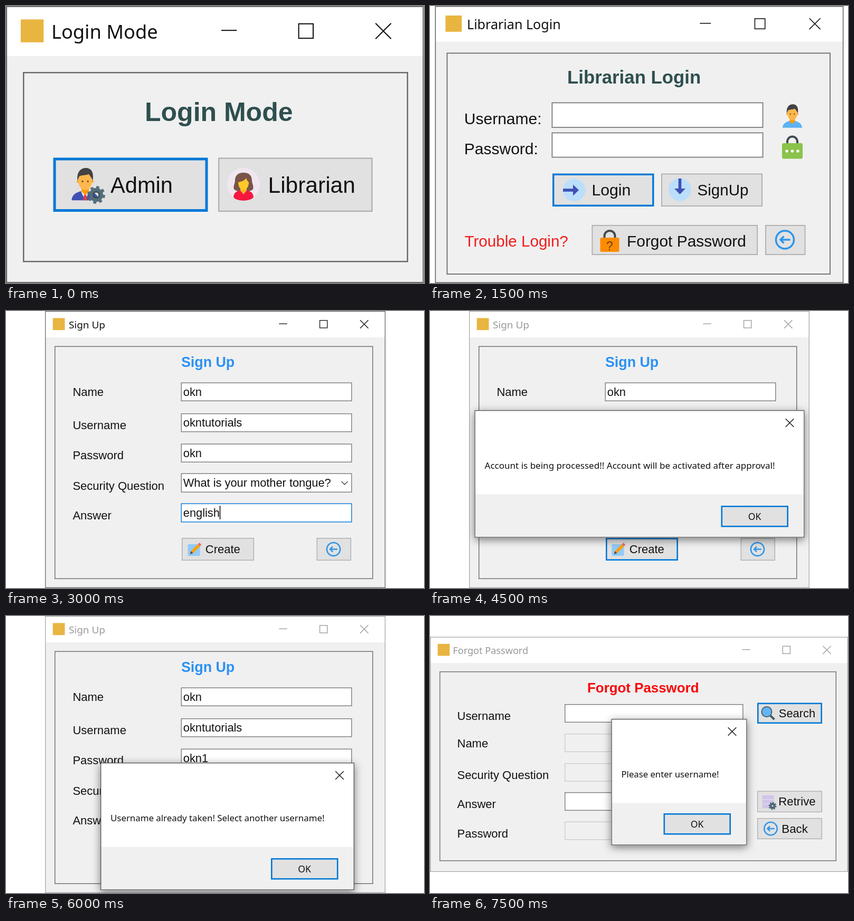
Write an HTML page that moves like this. It is 792 by 525 pixels and loops after 8 s.

```html
<!DOCTYPE html>
<html lang="en">
<head>
<meta charset="utf-8">
<title>Library login forms</title>
<style>
  html, body { margin: 0; width: 100%; height: 100%; overflow: hidden; background: #fff; }
  svg { display: block; width: 792px; height: 525px; }
  text { font-family: "Liberation Sans", Arial, sans-serif; }
  .ui { font-family: "Noto Sans", "Open Sans", sans-serif; }
  .bold { font-weight: bold; }
  .mid { text-anchor: middle; }
  .dialog { filter: drop-shadow(0 4px 8px rgba(0, 0, 0, .5)); }
</style>
</head>
<body>
<svg id="stage" viewBox="0 0 792 525"></svg>
<script>
const BLUE = '#0078d7', FACE = '#f0f0f0', BUTTON = '#e1e1e1', GREY = '#adadad';

// Basic shapes; boxes are given by their outer edges.
const box = (x1, y1, x2, y2, fill, stroke = 'none', w = 0) =>
  `<rect x="${x1 + w / 2}" y="${y1 + w / 2}" width="${x2 - x1 - w}" height="${y2 - y1 - w}" fill="${fill}" stroke="${stroke}" stroke-width="${w}"/>`;
const text = (x, y, s, size, cls = '', fill = '#111') =>
  `<text x="${x}" y="${y}" font-size="${size}" class="${cls}" fill="${fill}">${s}</text>`;
const fill = (d, color) => `<path d="${d}" fill="${color}"/>`;
const line = (d, color, w) => `<path d="${d}" fill="none" stroke="${color}" stroke-width="${w}"/>`;
const dot = (x, y, r, color) => `<circle cx="${x}" cy="${y}" r="${r}" fill="${color}"/>`;
const ring = (x, y, r, color, w, extra = '') =>
  `<circle cx="${x}" cy="${y}" r="${r}" fill="none" stroke="${color}" stroke-width="${w}" ${extra}/>`;
const place = (x, y, s, body) => `<g transform="translate(${x} ${y}) scale(${s})">${body}</g>`;
const cross = (x, y, r, color, w) =>
  line(`M${x - r} ${y - r}l${2 * r} ${2 * r}m0 ${-2 * r}l${-2 * r} ${2 * r}`, color, w);

// Form parts
function windowFrame(x1, y1, x2, y2, k, title, titleX, titleSize, active = true) {
  const ink = active ? '#111' : '#999', edge = active ? '#6b6b6b' : '#aaa';
  const w = .5 + .5 * k, r = 4.75 * k, cy = y1 + 15.3 * k;
  const [minX, maxX, closeX] = [119, 72, 24.7].map(d => x2 - d * k);
  return box(x1, y1, x2, y2, FACE) + box(x1, y1, x2, y1 + 30.6 * k, '#fff') +
    box(x1, y1, x2, y2, 'none', edge, w) +
    box(x1 + 9 * k, y1 + 8.2 * k, x1 + 23 * k, y1 + 22.2 * k, '#e9b541') +
    text(titleX, y1 + 20.1 * k, title, titleSize, 'ui', ink) +
    line(`M${minX - r} ${cy - .4 * k}h${2 * r}`, ink, w) +
    box(maxX - r, cy - r, maxX + r, cy + r, 'none', ink, w) +
    cross(closeX, cy, r, ink, w);
}
const panel = (x1, y1, x2, y2, w) => box(x1, y1, x2, y2, 'none', '#6b6b6b', w);
const button = (x1, y1, x2, y2, w = 1.3, focused = false) =>
  box(x1, y1, x2, y2, BUTTON, focused ? BLUE : GREY, w);
const field = (x1, y1, x2, y2, stroke = '#7a7a7a', w = 1.4) => box(x1, y1, x2, y2, '#fff', stroke, w);
const labels = (x, rows, size) => rows.map(([y, s]) => text(x, y, s, size)).join('');

function dialog(x1, y1, x2, y2, message, size) {
  return `<g class="dialog">${box(x1, y1, x2, y2, '#fff')}</g>` +
    box(x1, y1 + 159.5, x2, y2, FACE) + box(x1, y1, x2, y2, 'none', '#555', 1.3) +
    cross(x2 - 28, y1 + 24, 7.8, '#111', 1.4) +
    text(x1 + 19, y1 + 111.3, message, size, 'ui') +
    button(x2 - 158, y2 - 60.5, x2 - 30.5, y2 - 20, 2.6, true) +
    text(x2 - 94.5, y2 - 33.5, 'OK', 17.6, 'ui mid');
}

// Icons
const person = (x, y, s, coat, detail = '') => place(x, y, s,
  fill('M-18.5 22C-18 13-11 11-5 9H5C11 11 18 13 18.5 22Z', coat) + detail +
  fill('M-5 5H5V10L0 15L-5 10Z', '#ff9800') +
  dot(-9.5, -4, 2, '#ffa726') + dot(9.5, -4, 2, '#ffa726') +
  '<ellipse cy="-4.5" rx="9.3" ry="12.5" fill="#ffb74d"/>' +
  fill('M-10.500-5C-12-17-6-22.500 1-22.500C9-22.500 12-16 10.500-5L8.500-9 5-14C0-12-5-13-8-11Z', '#424242') +
  dot(-3.7, -4, 1.2, '#784719') + dot(3.7, -4, 1.2, '#784719'));
const shirt = fill('M-6 9L0 22 6 9Z', '#fff') + fill('M-1.500 14H1.500L3 22H-3Z', '#d84343');

const woman = (x, y) => place(x, y, 1,
  dot(0, 0, 31, '#f0e6f0') +
  fill('M0-22C-13-22-16-14-16-7C-16-1-20 3-18 9C-14 14-6 13 0 13S14 14 18 9C20 3 16-1 16-7C16-14 13-22 0-22Z', '#795548') +
  fill('M-19 24C-18 13-8 11 0 11S18 13 19 24C15 33-15 33-19 24Z', '#f5173f') +
  fill('M-6 6H6V12L0 19-6 12Z', '#f5b52e') +
  fill('M-10-4Q2-6 5-12Q7-6 10-4C10 5 5 11 0 11S-10 5-10-4Z', '#ffca28'));

const gear = (x, y, r) =>
  ring(x, y, r * .55, '#546e7a', r * .5) +
  ring(x, y, r * .87, '#546e7a', r * .3, 'pathLength="16" stroke-dasharray="1 1"') +
  ring(x, y, r * .34, '#37474f', r * .14);

const shackle = (x, y, r) => line(`M${x - r} ${y + 8}V${y}a${r} ${r} 0 0 1 ${2 * r} 0v8`, '#424a50', 4);
const arrow = (x, y, angle) => dot(x, y, 21.5, '#bbdefb') +
  `<g transform="translate(${x} ${y}) rotate(${angle})">` +
  line('M-21 0H2', '#3f51b5', 5.6) + fill('M-2-10.500L9 0-2 10.500Z', '#3f51b5') + '</g>';
const back = (x, y, s) => place(x, y, s,
  ring(0, 0, 17, '#2f95ea', 3.5) + line('M10 0H-8M-2-6.500L-8.500 0-2 6.500', '#2f95ea', 3.5));
const pencil = (x, y) => place(x, y, 1,
  box(-12, -9, 11, 13, '#90caf9') + line('M-4 6L10-8', '#ffa000', 5.5) +
  line('M9-7L12-10', '#e57373', 5.5) + fill('M-6 4L-2 8-8 10Z', '#5d4a37'));

// Scenes
const loginMode = () =>
  windowFrame(0, 0, 791.5, 525, 3.1, 'Login Mode', 86, 36.2) +
  panel(32, 125, 762, 485.5, 2.5) +
  text(263, 218, 'Login Mode', 50, 'bold', '#2f4f4f') +
  button(89.5, 287.5, 382.5, 390, 5, true) +
  person(150, 338, 1.38, '#3f51b5', shirt) + gear(171, 358, 16.5) +
  text(198, 354, 'Admin', 41.6) +
  button(402, 287.5, 694.5, 390, 2.2) + woman(450, 338) +
  text(496.5, 354, 'Librarian', 42.5);

const librarianLogin = () =>
  windowFrame(9.5, 0, 783.5, 525, 2.2, 'Librarian Login', 70, 25.1) +
  panel(31.5, 88.5, 759, 509, 1.8) +
  text(260, 147, 'Librarian Login', 34.8, 'bold', '#2f4f4f') +
  labels(64.8, [[224, 'Username:'], [281, 'Password:']], 30) +
  field(230.5, 182.5, 631.5, 231, '#7a7a7a', 1.8) + field(230.5, 239.5, 631.5, 287.5, '#7a7a7a', 1.8) +
  person(686.5, 208.7, 1, '#5cb3f3') +
  shackle(686.5, 257, 9.5) +
  '<rect x="667" y="260" width="39" height="29.500" rx="3" fill="#8bc34a"/>' +
  [676, 686.5, 697].map(x => dot(x, 275, 2.7, '#fff')).join('') +
  button(232, 317.5, 424.5, 380, 3.4, true) + arrow(273, 349, 0) +
  text(306.5, 359, 'Login', 30.2) +
  button(438, 317.5, 630, 380, 1.8) + arrow(473.5, 348, 90) +
  text(506.5, 359, 'SignUp', 29.6) +
  text(65.5, 456, 'Trouble Login?', 29.6, '', '#f01c1c') +
  button(306.5, 415, 621, 472, 1.8) + shackle(340.5, 436, 10) +
  '<rect x="322.500" y="439" width="36" height="27" rx="2.500" fill="#fb8c00"/>' +
  text(340.5, 463, '?', 23, 'mid', '#6d3b0a') +
  text(373, 456, 'Forgot Password', 29.9) +
  button(635, 415, 711.5, 472, 1.8) + back(672.5, 443, 1);

function signUp({ password = 'okn', active = true, answerFocused = false, createFocused = false } = {}) {
  const x1 = 331.5, x2 = 655.5;
  return windowFrame(74, 0, 719, 525, 1.63, 'Sign Up', 119, 18.9, active) +
    panel(92, 66.5, 695.5, 508, 1.4) +
    text(332, 105.5, 'Sign Up', 26.8, 'bold', '#2b91f5') +
    labels(126.4, [[160.5, 'Name'], [224, 'Username'], [281, 'Password'],
      [338.5, 'Security Question'], [395, 'Answer']], 22) +
    field(x1, 135.5, x2, 171) + field(x1, 194, x2, 229.5) + field(x1, 251.5, x2, 287) +
    field(x1, 307.5, x2, 344) + line('M635.500 323L641.500 329 647.500 323', '#444', 1.4) +
    field(x1, 364.5, x2, 400.5, answerFocused ? BLUE : '#7a7a7a') +
    labels(335.8, [[160.5, 'okn'], [219, 'okntutorials'], [276.5, password],
      [332.5, 'What is your mother tongue?'], [389.5, 'english']], 21.8) +
    (answerFocused ? line('M405.500 369V395', '#000', 1.5) : '') +
    button(333, 430, 470, 473, createFocused ? 2.6 : 1.4, createFocused) +
    pencil(356.5, 451) + text(377.8, 459, 'Create', 22) +
    button(588.5, 430, 654, 473, 1.4) + back(620.5, 451.5, .74);
}

function forgotPassword() {
  const rows = [[167, true], [223, false], [279, false], [334, true], [389.5, false]];
  return windowFrame(0, 39.5, 792, 485, 1.62, 'Forgot Password', 43.3, 18.1, false) +
    panel(18, 105, 770, 464.5, 1.4) +
    text(298, 145, 'Forgot Password', 25.9, 'bold', '#fa0505') +
    labels(51.5, [[196.5, 'Username'], [248.5, 'Name'], [308.5, 'Security Question'],
      [364, 'Answer'], [419.5, 'Password']], 22) +
    rows.map(([y, enabled]) => box(255, y, 593.5, y + 35, enabled ? '#fff' : FACE,
      enabled ? '#7a7a7a' : '#ccc', 1.4)).join('') +
    button(620, 164.5, 743, 204, 2.6, true) +
    line('M645 189L652.500 196', '#455a64', 4) + dot(638, 181.5, 10.5, '#455a64') + dot(638, 181.5, 8.7, '#64b5f6') +
    text(660.8, 191.5, 'Search', 21.9) +
    button(620, 331.5, 743, 372) +
    [340, 348.5, 357].map(y => box(629.5, y, 651.5, y + 7.3, '#d1c4e9')).join('') + gear(649, 360, 7.5) +
    text(660.3, 359, 'Retrive', 22.2) +
    button(620, 383, 743, 423) + back(645.5, 403, .72) +
    text(666.3, 411, 'Back', 22.3);
}

const clipped = body => `<g clip-path="url(#form)">${body}</g>`;
const scenes = [
  loginMode(),
  librarianLogin(),
  signUp({ answerFocused: true }),
  clipped(signUp({ active: false, createFocused: true }) +
    dialog(84.5, 188, 709.5, 429.5, 'Account is being processed!! Account will be activated after approval!', 17.05)),
  clipped(signUp({ active: false, password: 'okn1' }) +
    dialog(179, 278, 660, 519.5, 'Username already taken! Select another username!', 16.85)),
  forgotPassword() + dialog(343.5, 195, 600.5, 434.5, 'Please enter username!', 16.7)
];

const stage = document.getElementById('stage');
stage.innerHTML = '<clipPath id="form"><rect x="74" width="645" height="525"/></clipPath>' +
  scenes.map(s => `<g class="scene" display="none">${s}</g>`).join('');
const groups = stage.querySelectorAll('.scene');

const LOOP = 8000, HOLD = 1500;
let shown = -1;
function draw() {
  const index = Math.floor(performance.now() % LOOP / HOLD);
  if (index !== shown) {
    groups.forEach((g, i) => g.setAttribute('display', i === index ? 'inline' : 'none'));
    shown = index;
  }
  requestAnimationFrame(draw);
}
draw();
</script>
</body>
</html>
```
